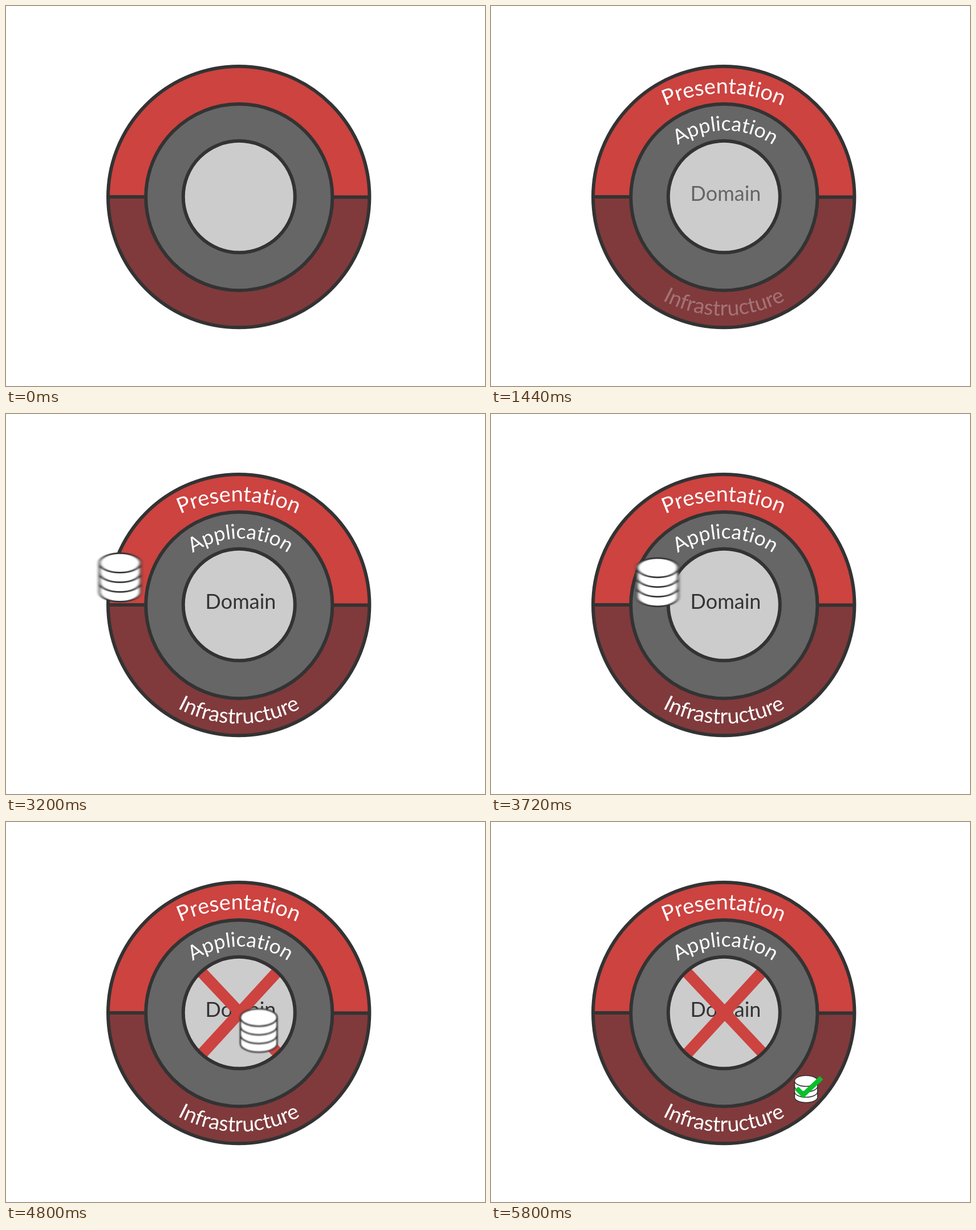
An HTML page that plays this animation: 840x667 px, repeating every 9000 ms.

```html
<!DOCTYPE html>
<html lang="en">
<head>
<meta charset="utf-8">
<title>Layers</title>
<style>
  html, body { margin: 0; width: 100%; height: 100%; overflow: hidden; background: #fff; }
  svg { display: block; width: 840px; height: 667px; }
  text { font-family: Lato, "Open Sans", sans-serif; font-variant-ligatures: none; text-anchor: middle; fill: #fff; }
  .line { fill: none; stroke: #333; stroke-width: 6; }
</style>
</head>
<body>
<svg viewBox="0 0 840 667">
  <defs>
    <path id="arcPresentation" d="M158 403.5A250 250 0 0 1 658 403.5"/>
    <path id="arcApplication" d="M262 367.5A149 149 0 0 1 560 367.5"/>
    <path id="arcInfrastructure" d="M179.5 314.5A229 229 0 0 0 637.5 314.5"/>
    <filter id="blur" x="-30%" y="-30%" width="160%" height="160%" color-interpolation-filters="sRGB">
      <feGaussianBlur id="blurAmount" stdDeviation="0"/>
    </filter>
  </defs>

  <path fill="#cc4340" d="M179 335A229.2 229.2 0 0 1 637.4 335Z"/>
  <path fill="#803a3c" d="M179 335A229.2 229.2 0 0 0 637.4 335Z"/>
  <path class="line" d="M180 334.9L637 335.5"/>
  <circle class="line" cx="408.2" cy="335.1" r="229.2"/>
  <circle class="line" cx="408.8" cy="335.6" r="163.6" style="fill:#666"/>
  <circle cx="408.8" cy="334.8" r="98" fill="#ccc"/>

  <text id="presentation" font-size="38"><textPath href="#arcPresentation" startOffset="50%">Presentation</textPath></text>
  <text id="application" font-size="35.7"><textPath href="#arcApplication" startOffset="50%">Application</textPath></text>
  <text id="domain" font-size="36" x="411.5" y="342" style="fill:#333">Domain</text>
  <text id="infrastructure" font-size="37.4"><textPath href="#arcInfrastructure" startOffset="50%">Infrastructure</textPath></text>

  <path id="cross" stroke="#cc4340" stroke-width="20" d="M342.5 263L476 405M475.5 263L343.5 407"/>
  <circle class="line" cx="408.8" cy="334.8" r="98"/>

  <g id="blurLayer">
    <g id="database" fill="#fff" stroke="#333" stroke-width="2.8">
      <path d="M-36-26V25A36 17 0 0 0 36 25V-26"/>
      <path fill="none" d="M-36-9A36 17 0 0 0 36-9M-36 8A36 17 0 0 0 36 8"/>
      <ellipse cy="-26" rx="36" ry="17"/>
    </g>
  </g>
  <path id="check" fill="none" stroke="#07bf2a" stroke-width="8.5" d="M536 467.5L547.5 479L579.5 449"/>
</svg>
<script>
  const LOOP = 9000, STEP = 40, SHUTTER = 20;
  const $ = id => document.getElementById(id);

  const span = (t, from, to) => Math.min(1, Math.max(0, (t - from) / (to - from)));
  const smooth = u => u * u * (3 - 2 * u);
  const quad = u => u < 0.5 ? 2 * u * u : 1 - 2 * (1 - u) ** 2;
  const mix = (a, b, u) => a + (b - a) * u;
  const curve = (a, b, c, u) => a.map((v, i) => mix(mix(v, b[i], u), mix(b[i], c[i], u), u));

  const OUTSIDE = [118.4, 336], EDGE = [254.5, 288.5], CENTER = [409, 334.5], HOME = [552.5, 469];
  const travelHome = t => smooth(span(t, 4440, 5575));

  function position(t) {
    if (t < 3500) return curve(OUTSIDE, [160, 275], EDGE, quad(span(t, 2880, 3412)));
    if (t < 4200) return curve(EDGE, [332, 301], CENTER, quad(span(t, 3570, 4000)));
    return CENTER.map((v, i) => mix(v, HOME[i], travelHome(t)));
  }

  const fades = [
    ["presentation", 40, 1040],
    ["application", 400, 1400],
    ["domain", 770, 1770],
    ["infrastructure", 1150, 2150]
  ];

  function render(t) {
    for (const [id, from, to] of fades) $(id).style.opacity = span(t, from, to);
    $("cross").style.opacity = smooth(span(t, 4330, 4760));
    $("check").style.opacity = smooth(span(t, 5480, 5800));

    const [x, y] = position(t);
    const scale = span(t, 2270, 2930) * mix(1, 0.56, travelHome(t));
    $("database").setAttribute("transform", `translate(${x} ${y}) scale(${scale})`);
    $("database").style.display = scale > 0 ? "" : "none";

    // Motion blur follows the distance covered while the shutter is open.
    const before = position(t - SHUTTER / 2), after = position(t + SHUTTER / 2);
    const spread = after.map((v, i) => Math.abs(v - before[i]) / 3.46);
    const moving = Math.max(...spread) > 0.1;
    if (moving) $("blurAmount").setAttribute("stdDeviation", spread.join(" "));
    $("blurLayer").setAttribute("filter", moving ? "url(#blur)" : "none");
  }

  const start = performance.now();
  function tick() {
    const t = (performance.now() - start) % LOOP;
    render(Math.floor(t / STEP) * STEP);
    requestAnimationFrame(tick);
  }
  tick();
</script>
</body>
</html>
```
